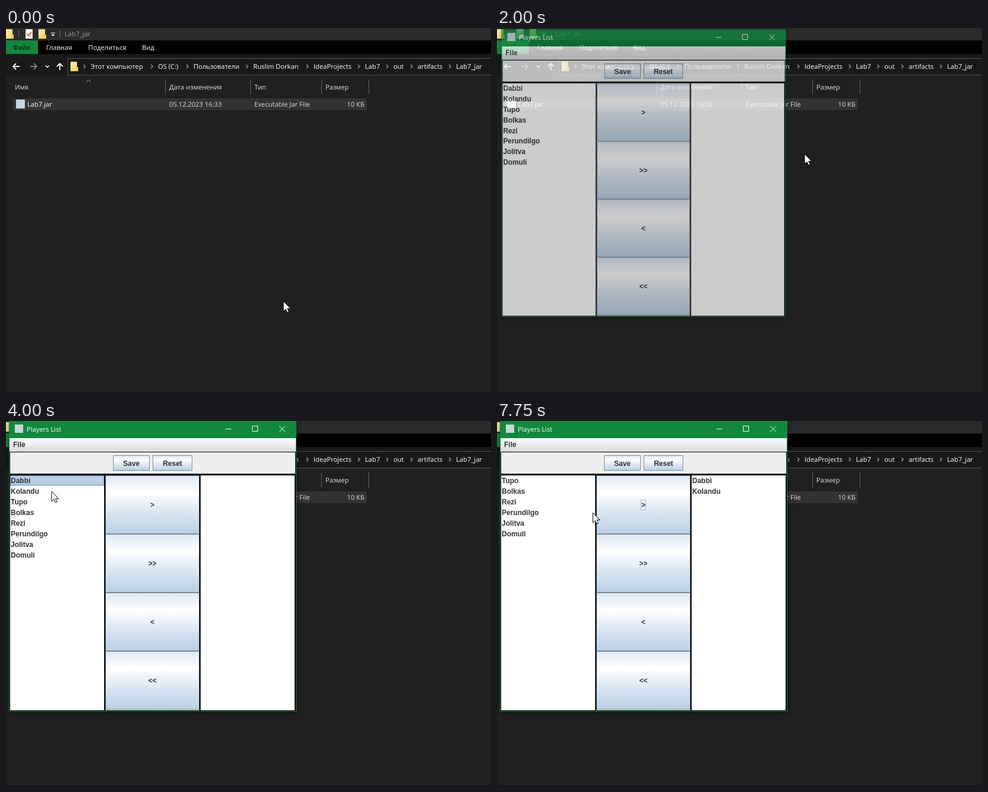
An HTML page that plays this animation: 820x617 px, repeating every 8 s.

```html
<!DOCTYPE html>
<html lang="ru">
<head>
<meta charset="utf-8">
<title>Players List</title>
<style>
  html, body { margin: 0; width: 100%; height: 100%; overflow: hidden; background: #202020; }
  svg { display: block; width: 820px; height: 617px; }
  text { font: 11.2px "Open Sans", "Noto Sans", sans-serif; fill: #fff; white-space: pre; }
  .path { font-weight: 500; }
  .dim { fill: #dedede; }
  .swing text { font: bold 12px "Liberation Sans", Arial, sans-serif; fill: #333; }
  .swing .caption { font: 11.2px "Open Sans", "Noto Sans", sans-serif; fill: #fff; }
  .swing .tip { font-weight: normal; }
  .mid { text-anchor: middle; }
  .end { text-anchor: end; }
  .shadow { filter: drop-shadow(0 2px 4px rgba(0, 0, 0, .45)); }
</style>
</head>
<body>
<svg id="stage" viewBox="0 0 820 617">
  <defs>
    <linearGradient id="metal" x2="0" y2="1">
      <stop offset="0" stop-color="#dde8f3"/>
      <stop offset=".3" stop-color="#fff"/>
      <stop offset=".6" stop-color="#dde8f3"/>
      <stop offset="1" stop-color="#b8cfe5"/>
    </linearGradient>
    <linearGradient id="menu" x2="0" y2="1">
      <stop offset="0" stop-color="#fff"/>
      <stop offset="1" stop-color="#dadada"/>
    </linearGradient>
    <linearGradient id="folder" x2="1" y2="1">
      <stop offset="0" stop-color="#ffeca0"/>
      <stop offset="1" stop-color="#fbd764"/>
    </linearGradient>
  </defs>
  <g id="explorer"></g>
  <g id="app" class="swing"></g>
  <path id="cursor" d="M0 0V17L4 13.3L6.6 19L9.3 17.8L6.7 12.2H12Z" fill="#fff" stroke="#000"/>
</svg>
<script>
const $ = id => document.getElementById(id);
const GREEN = '#10893e', STEEL = '#7a8a99', SKY = '#b8cfe5', BLUE = '#6382bf';

const rect = (x, y, w, h, fill, extra = '') =>
  `<rect x="${x}" y="${y}" width="${w}" height="${h}" fill="${fill}" ${extra}/>`;
const frame = (x, y, w, h, color, fill = 'none') =>
  rect(x + .5, y + .5, w - 1, h - 1, fill, `stroke="${color}"`);
const text = (x, y, s, cls = '', extra = '') =>
  `<text x="${x}" y="${y}" class="${cls}" ${extra}>${s.replace(/</g, '&lt;')}</text>`;
const line = (d, color = '#fff', w = 1) =>
  `<path d="${d}" fill="none" stroke="${color}" stroke-width="${w}"/>`;
const folder = (x, y) =>
  rect(x, y, 11, 16, 'url(#folder)') + rect(x + 9, y + 9, 4, 7, '#f5cf55');

const crumbs = [
  [143, 'Этот компьютер'], [257, 'OS (C:)'], [317, 'Пользователи'],
  [418, 'Ruslim Dorkan'], [520, 'IdeaProjects'], [607, 'Lab7'],
  [655, 'out'], [696, 'artifacts'], [761, 'Lab7_jar']
];
const tabs = [[68, 'Главная'], [139, 'Поделиться'], [230, 'Вид']];
const columns = [[15, 'Имя', 269], [276, 'Дата изменения', 413], [420, 'Тип', 533], [540, 'Размер', 613]];
const players = ['Dabbi', 'Kolandu', 'Tupo', 'Bolkas', 'Rezi', 'Perundilgo', 'Jolitva', 'Domuli'];

function drawExplorer(active) {
  const title = rect(0, 0, 820, 21, active ? GREEN : '#2b2b2b')
    + folder(0, 2) + line('M21.5 4V16M91.5 4V16', active ? '#7fbf96' : '#777')
    + rect(33, 2, 12, 16, '#f4f4f4') + line('M35.5 10L38 13L43 7', '#d8452e', 1.6)
    + folder(55, 2) + line('M76 8.5H83') + '<path d="M76.500 11H82.500L79.500 14Z" fill="#fff"/>'
    + text(99, 14, 'Lab7_jar', '', active ? '' : 'style="fill:#a0a0a0"');

  const ribbon = rect(0, 21, 820, 23, '#000') + rect(0, 21, 54, 23, GREEN)
    + text(12, 37, 'Файл', '', 'style="fill:#000"')
    + tabs.map(([x, s]) => text(x, 37, s)).join('');

  const nav = rect(0, 44, 820, 36, '#191919') + frame(104, 51, 720, 29, '#535353')
    + line('M23 65H12M17 60L12 65L17 70', '#fff', 1.8)
    + line('M41 65H52M47 60L52 65L47 70', '#858585', 1.8)
    + line('M67 63.500L70 66.500L73 63.500', '#fff', 1.5)
    + line('M91 71V60M86 65L91 60L96 65', '#fff', 1.8)
    + folder(109, 57)
    + crumbs.map(([x, s]) => line(`M${x - 12} 62l3 3l-3 3`, '#aaa', 1.2) + text(x, 69, s, 'path')).join('');

  const head = columns.map(([x, s, edge]) =>
    text(x, 104, s, 'dim') + line(`M${edge + .5} 87V112`, '#636363')).join('')
    + line('M135.500 91.500L139.500 87.500L143.500 91.500', '#aaa');

  const row = frame(12, 119, 598, 20, active ? '#8c8c8c' : '#333', active ? '#777' : '#333')
    + rect(17, 121, 15, 15, '#cbd6e0')
    + text(36, 133, 'Lab7.jar') + text(276, 133, '05.12.2023 16:33', 'dim')
    + text(420, 133, 'Executable Jar File', 'dim') + text(606, 133, '10 КБ', 'dim end');

  $('explorer').innerHTML = rect(0, 0, 820, 617, '#202020') + title + ribbon + nav + head + row
    + rect(0, 616, 820, 1, '#0c0c0c');
}

function button(x, y, w, h, label, focus, hover) {
  const cx = x + w / 2, cy = y + h / 2, half = label.length > 2 ? 15 : 4.5;
  let s = rect(x, y, w, h, 'url(#metal)');
  s += hover
    ? frame(x, y, w, h, SKY) + frame(x + 1, y + 1, w - 2, h - 2, STEEL) + frame(x + 2, y + 2, w - 4, h - 4, SKY)
    : frame(x, y, w, h, STEEL);
  if (focus) s += frame(Math.round(cx - half), Math.round(cy - 8.5), half * 2, 18, '#a3b8cc');
  return s + text(cx, Math.round(cy + 4.5), label, 'mid');
}

const list = (x, names) => names.map((s, i) => text(x, 105 + 18 * i, s)).join('');

function drawApp({ moved, selected, focus, hover, tip }) {
  const title = rect(5, 0, 486, 491, GREEN, 'class="shadow"')
    + rect(15, 6, 14, 14, '#cbd6e0') + text(35, 18, 'Players List', 'caption')
    + line('M371 13.500H381M416.500 8.500H425.500V17.500H416.500ZM462 8.500L472 18.500M472 8.500L462 18.500');

  const top = rect(6, 29, 484, 23, 'url(#menu)') + text(12, 44, 'File')
    + frame(6, 52, 484, 38, '#000', '#eee')
    + button(181, 58, 62, 26, 'Save', focus === 'Save') + button(248, 58, 67, 26, 'Reset');

  const body = rect(6, 90, 484, 400, '#000') + rect(7, 92, 159, 397, '#fff')
    + rect(168, 92, 159, 397, '#fff') + rect(329, 92, 159, 397, '#fff')
    + (selected ? frame(7, 92, 159, 17, BLUE, SKY) : '')
    + list(8, players.slice(moved)) + list(330, players.slice(0, moved))
    + ['>', '>>', '<', '<<'].map((s, i) =>
        button(168, 92 + 99 * i, 159, 99, s, focus === s, hover && !i)).join('');

  const hint = tip
    ? frame(250, 158, 136, 18, BLUE, SKY) + text(254, 172, 'Add highlighted players', 'tip') : '';

  $('app').innerHTML = title + top + body + hint;
}

// time, x, y of the pointer tip
const track = [
  [0, 469, 462], [1000, 236, 136], [1500, 240, 134], [1750, 264, 154], [2000, 520, 213],
  [2250, 520, 213], [2500, 417, 205], [3000, 250, 52], [3500, 84, 98], [3750, 76, 104],
  [4000, 77, 119], [4500, 232, 140], [4750, 246, 142], [5000, 190, 130], [5250, 92, 100],
  [5500, 104, 102], [5750, 250, 138], [7250, 250, 138], [7750, 162, 155]
];

function pointer(t) {
  const i = track.findIndex(k => k[0] >= t);
  if (i < 1) return track[0].slice(1);
  const [a, ...p] = track[i - 1], [b, ...q] = track[i];
  return p.map((v, n) => Math.round(v + (q[n] - v) * (t - a) / (b - a)));
}

const LOOP = 8000, STEP = 250;
const within = (t, a, b) => t >= a && t < b;

function render(t) {
  drawExplorer(within(t, 1000, 2000));
  const app = $('app'), opening = t < 2250;
  app.style.display = t < 2000 ? 'none' : '';
  app.setAttribute('opacity', opening ? .77 : 1);
  app.setAttribute('transform', opening ? 'translate(248 240) scale(.99) translate(-248 -240)' : '');
  const selected = within(t, 3750, 4750) || within(t, 5500, 7250);
  drawApp({
    moved: t < 4750 ? 0 : t < 7250 ? 1 : 2,
    selected,
    focus: selected ? '' : t < 3750 ? 'Save' : '>',
    hover: within(t, 4500, 5250) || within(t, 5750, 7750),
    tip: within(t, 6500, 7250)
  });
  $('cursor').setAttribute('transform', `translate(${pointer(t)})`);
}

const start = performance.now();
let last = -1;
function tick() {
  const t = Math.floor((performance.now() - start) % LOOP / STEP) * STEP;
  if (t !== last) render(last = t);
  requestAnimationFrame(tick);
}
tick();
</script>
</body>
</html>
```
